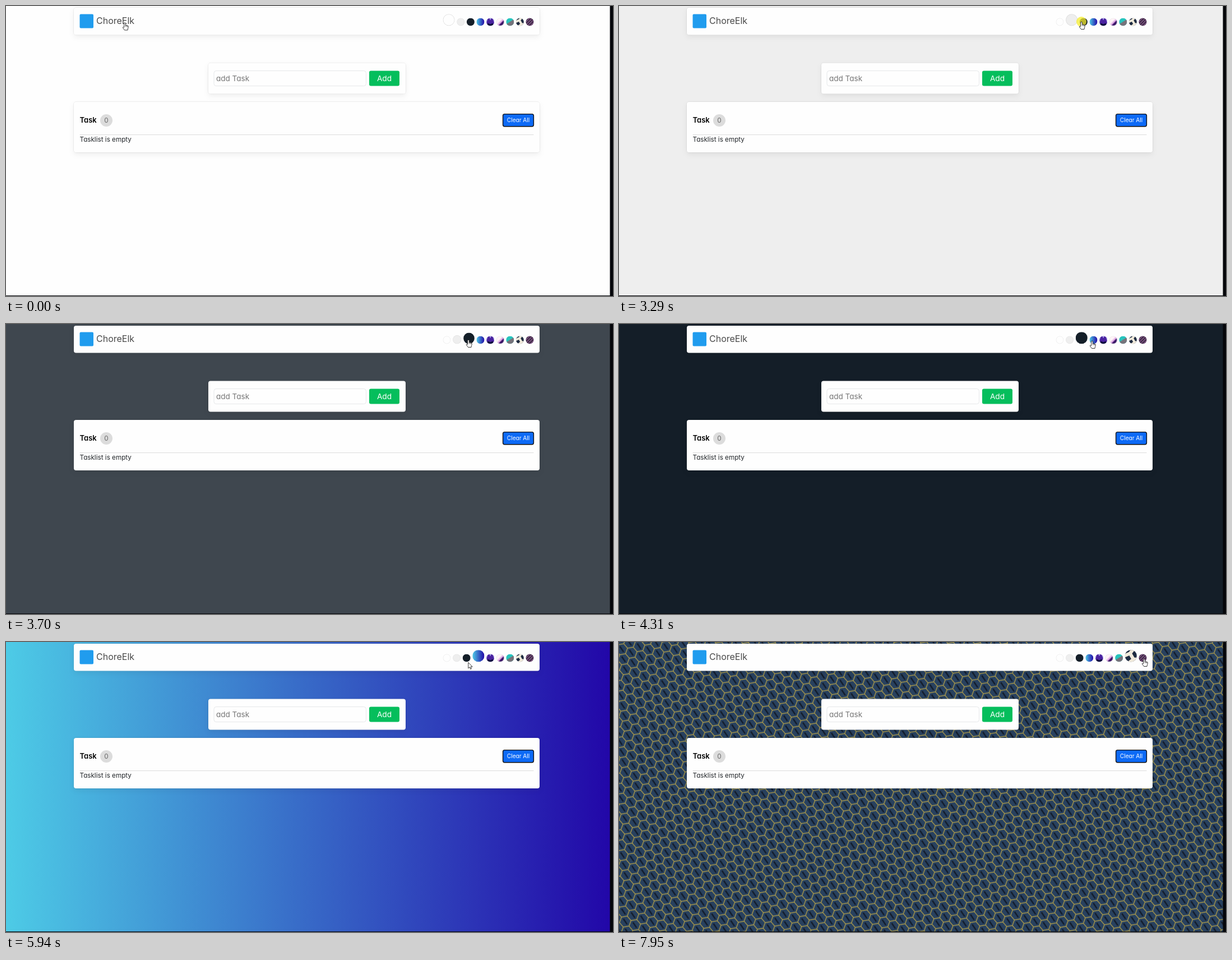
Animation, 1083 px wide and 517 px high, one loop 8000 ms. Source, as an HTML page:

```html
<!DOCTYPE html>
<html lang="en">
<head>
<meta charset="utf-8">
<title>Task list themes</title>
<style>
  html, body { margin: 0; width: 100%; height: 100%; overflow: hidden; background: #000; }
  svg { display: block; width: 1083px; height: 517px; font-family: Inter, "Open Sans", sans-serif; font-feature-settings: "cv11"; }
  .card { fill: #fefefe; stroke: rgba(0,0,0,.08); stroke-width: 1.4; paint-order: stroke; filter: drop-shadow(0 4px 5px rgba(0,0,0,.06)); }
  .mid { text-anchor: middle; }
  .pointer { fill: #fff; stroke: #222; stroke-width: .9; stroke-linejoin: round; }
</style>
</head>
<body>
<svg viewBox="0 0 1083 517">
  <defs>
    <linearGradient id="ocean"><stop stop-color="#4dcbe6"/><stop offset="1" stop-color="#2207a8"/></linearGradient>
    <linearGradient id="blush" x2="1" y2="1">
      <stop offset=".4" stop-color="#fff4f8"/><stop offset=".58" stop-color="#d69be0"/><stop offset=".66" stop-color="#3a1568"/>
    </linearGradient>
    <pattern id="hex" width="20.8" height="36" patternUnits="userSpaceOnUse" patternTransform="rotate(20) scale(.87)">
      <path fill="#28415f" d="M0 0H20.8V36H0z"/>
      <path stroke="#131c2a" stroke-width="3" d="M5 8 16 16M-5.4 26 5.6 34M15.4 26 26.4 34"/>
      <path fill="none" stroke="#bda648" stroke-width="1.4" d="M0 6 10.4 0 20.8 6V18L10.4 24 0 18zM10.4 24V36"/>
    </pattern>
    <clipPath id="disc"><circle r="7"/></clipPath>
  </defs>

  <rect width="1083" height="517" fill="#05060a"/>
  <rect id="page" width="1077.5" height="516"/>

  <rect class="card" x="121" y="3" width="831" height="48.5" rx="4"/>
  <rect class="card" x="361" y="101.5" width="352" height="55" rx="4"/>
  <rect class="card" x="121" y="171" width="831" height="90" rx="4"/>

  <rect x="131.5" y="14.5" width="24.5" height="25" rx="2" fill="#209cee"/>
  <text x="161" y="32.4" font-size="16" fill="#4a4a4a">ChoreElk</text>

  <rect x="371" y="115.5" width="271.5" height="27" rx="4" fill="#fefefe" stroke="#e6e8ea"/>
  <text x="375" y="133.6" font-size="13.5" fill="#757575">add Task</text>
  <rect x="648" y="115.5" width="54" height="27" rx="3" fill="#05be5c"/>
  <text class="mid" x="675" y="133.8" font-size="13.7" fill="#fff">Add</text>

  <text x="131.5" y="208" font-size="13" font-weight="600">Task</text>
  <circle cx="179" cy="204" r="11" fill="#dcdcdc"/>
  <text class="mid" x="179" y="208.2" font-size="11.7" fill="#666">0</text>
  <rect x="886.6" y="192.6" width="54.8" height="22.2" rx="3" fill="#0d6af6" stroke="#111" stroke-width="1.4"/>
  <text class="mid" x="914" y="207.2" font-size="10.1" fill="#fff">Clear All</text>
  <path stroke="#dcdcdc" d="M131.5 229.5H941.5"/>
  <text x="131.5" y="242.4" font-size="11.7" fill="#212529">Tasklist is empty</text>

  <g id="swatches"></g>
  <g id="cursor" class="pointer">
    <circle id="click" r="9" fill="#f6ee2e" stroke="none" opacity=".75"/>
    <path id="arrow" d="M0 0V10.5L2.4 8.3 4 12 5.7 11.2 4.2 7.7H7.4z"/>
    <g id="hand">
      <path d="M-1.3 8V.9Q0-.5 1.3.9V5Q4 4.6 6.1 6.2 6.5 9 5.5 10.6L5 13.5H-.5L-3.8 8.8Q-3.2 7.3-1.3 8.6z"/>
      <path fill="none" stroke-width=".6" d="M1.3 5V7.6M3 5.3V7.8M4.6 5.7V8"/>
    </g>
  </g>
</svg>

<script>
const $ = id => document.getElementById(id);
const box = fill => `<path fill="${fill}" d="M-7-7H7V7H-7z"/>`;
const ring = '<circle r="6.7" fill="none" stroke="#dcdcdc" stroke-width=".6"/>';

const icons = [
  box('#fefefe') + ring,
  box('#eee') + ring,
  box('#141e28'),
  box('url(#ocean)'),
  box('#4a22a0') + '<path fill="#a9a5e6" d="M-7-7H-4L-7 2zM7-7H4L7 2zM-2-7H2L0-3z"/><path fill="#0d0f3c" d="M-7 7-4 2 0 4 4 2 7 7z"/>',
  box('url(#blush)') + ring,
  box('#27c4bd') + '<path fill="#77737b" d="M7-5V7H-7V4z"/>',
  box('#1f2c42') + '<path fill="none" stroke="#f1eadb" stroke-width="4" d="M-8 0-1-3 3-8M-1-3 3 4 8 4M3 4-2 8"/>',
  box('#352d3d') + '<path stroke="#87508c" stroke-width="1.5" d="M-8 1 1-8M-7 5 5-7M-4 7 7-4M0 8 8 0"/>'
];
$('swatches').innerHTML = icons.map(s => `<g><g clip-path="url(#disc)">${s}</g></g>`).join('');
const swatches = [...$('swatches').children];

// start time and swatch index of each theme
const themes = [[-1000, 0], [2390, 1], [3500, 2], [4830, 3], [7340, 7]];
const flat = [[254, 254, 254], [238, 238, 238], [20, 30, 40]];
const images = { 3: 'url(#ocean)', 7: 'url(#hex)' };

// pointer trips: start, end, destination
const trips = [
  [0, 0, 212, 29.5],
  [690, 1080, 683, 12],
  [1180, 1680, 816, 28],
  [2290, 2890, 825, 28],
  [3700, 4100, 844, 30],
  [5130, 5630, 640, 88],
  [5630, 6140, 948, 2],
  [6140, 6740, 914, 30],
  [7440, 7950, 937, 30]
];
const STEP = 100, FADE = 500, CLICK = 300;

const mix = (a, b, p) => a + (b - a) * p;
const show = (id, on) => $(id).style.display = on ? '' : 'none';

// cubic-bezier(.25, .1, .25, 1)
function ease(x) {
  if (x >= 1) return 1;
  let lo = 0, hi = 1;
  for (let i = 0; i < 20; i++) {
    const u = (lo + hi) / 2;
    if (.75 * u * (1 - u) + u ** 3 < x) lo = u; else hi = u;
  }
  return .3 * lo * (1 - lo) ** 2 + 3 * lo * lo * (1 - lo) + lo ** 3;
}

function drawTheme(t) {
  const n = themes.findLastIndex(s => t >= s[0]);
  const [start, now] = themes[n];
  const before = n ? themes[n - 1][1] : now;
  const p = ease((Math.floor((t - start) / STEP) + .5) * STEP / FADE);
  $('page').setAttribute('fill', images[now] ||
    `rgb(${flat[now].map((c, i) => mix(flat[before][i], c, p))})`);

  // right-aligned row; only the plain colours resize gradually
  let right = 941.5;
  for (let i = swatches.length - 1; i >= 0; i--) {
    const size = k => k === i ? 10.6 : 7;
    const r = mix(size(before), size(now), i < flat.length ? p : 1);
    swatches[i].setAttribute('transform', `translate(${right - r} ${35.4 - r}) scale(${r / 7})`);
    right -= 2 * r + 3.6;
  }
}

function drawPointer(t) {
  const n = trips.findLastIndex(m => t >= m[0]);
  const [start, end, toX, toY] = trips[n];
  const [, , fromX, fromY] = trips[Math.max(0, n - 1)];
  const steps = Math.round((end - start) / STEP);
  const p = steps ? Math.min(1, Math.floor((t - start) / STEP + .1) / steps) : 1;
  const x = mix(fromX, toX, p), y = mix(fromY, toY, p);
  $('cursor').setAttribute('transform', `translate(${x} ${y})`);

  // a hand over the title and the swatches
  const hover = y > 18 && y < 36 && (x < 230 || x > 778 && x < 942);
  show('hand', hover);
  show('arrow', !hover);
  show('click', themes.some(([at]) => t >= at - CLICK && t < at));
}

function frame() {
  const t = performance.now() % 8000;
  drawTheme(t);
  drawPointer(t);
  requestAnimationFrame(frame);
}
frame();
</script>
</body>
</html>
```
